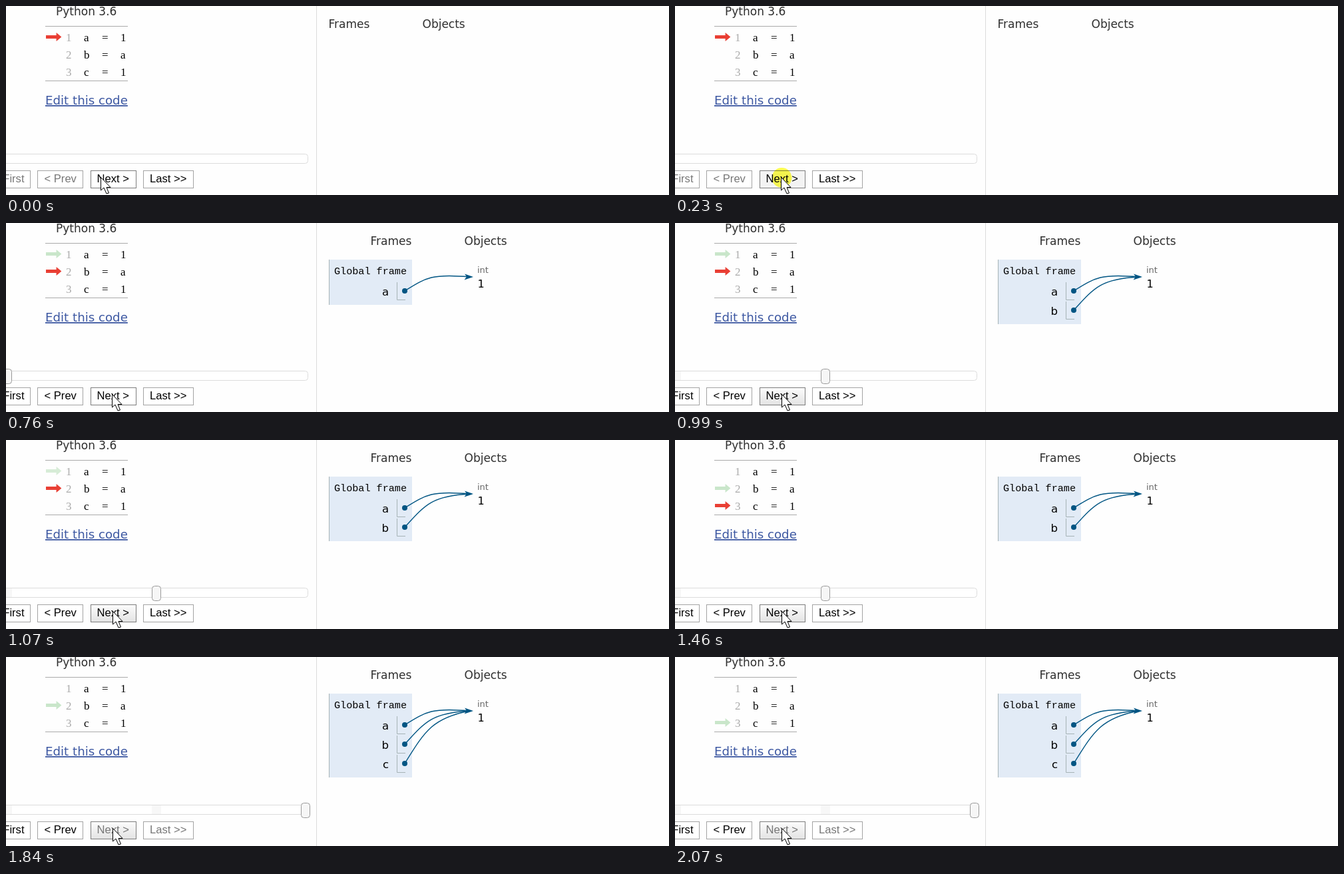
Write an HTML page that moves like this. It is 996 px wide and 284 px high and loops after 2.47 s.

```html
<!DOCTYPE html>
<html lang="en">
<head>
<meta charset="utf-8">
<title>Code stepper</title>
<style>
  html, body { margin: 0; width: 100%; height: 100%; overflow: hidden; background: #fefefe; }
  svg { display: block; width: 996px; height: 284px; }
  text { white-space: pre; }
  .ui { font: 17px "DejaVu Sans", Verdana, sans-serif; fill: #303030; }
  .code { font: 17px "Liberation Serif", "Times New Roman", serif; }
  .mono { font: 15.15px "Liberation Mono", "Courier New", monospace; }
  .num { fill: #aaa; }
  .btn rect { fill: #fff; stroke: #a3a3a3; }
  .btn text { font: 16.6px "Liberation Sans", Arial, sans-serif; }
  .btn.off text { fill: #777; }
  #next rect { stroke: #7d7d7d; }
  .wire { fill: none; stroke: #005583; stroke-width: 1.4; }
  .slot { fill: none; stroke: #a6b3b6; }
  .rule { stroke: #aaa; }
</style>
</head>
<body>
<svg viewBox="0 0 996 284">
  <defs>
    <path id="arrow" transform="scale(1.3)" d="M0 3H12V0L18 5 12 10V7H0Z"/>
    <linearGradient id="hover" x2="0" y2="1">
      <stop stop-color="#fcfcfc"/><stop offset="1" stop-color="#e3e3e3"/>
    </linearGradient>
  </defs>

  <path d="M466.5 0V284" stroke="#dcdcdc"/>
  <text class="ui" x="75" y="14">Python 3.6</text>
  <path class="rule" d="M59 30.5H183M59 112.5H183"/>
  <g id="lines"></g>
  <use id="prevArrow" href="#arrow"/>
  <use id="curArrow" href="#arrow" fill="#e93f34"/>
  <text class="ui" x="59" y="148" style="font-size:18.2px;fill:#3d58a2;text-decoration:underline">Edit this code</text>

  <rect x="-20.5" y="222.5" width="474" height="14" rx="4" fill="#fff" stroke="#dcdcdc"/>
  <rect id="trail1" x="-5" y="223" width="14" height="13" fill="#f7f7f7"/>
  <rect id="trail2" x="219" y="223" width="14" height="13" fill="#f7f7f7"/>
  <rect id="handle" y="219.5" width="13" height="22" rx="4" fill="#f6f6f6" stroke="#999"/>

  <g id="first" class="btn"><rect x="-40.5" y="247.5" width="77" height="26"/><text x="27.5" y="265" text-anchor="end">&lt;&lt; First</text></g>
  <g id="prev" class="btn"><rect x="47.5" y="247.5" width="68" height="26"/><text x="57.5" y="265">&lt; Prev</text></g>
  <g id="next" class="btn"><rect x="127.5" y="247.5" width="68" height="26"/><text x="136.5" y="265">Next &gt;</text></g>
  <g id="last" class="btn"><rect x="206.5" y="247.5" width="75" height="26"/><text x="216" y="265">Last &gt;&gt;</text></g>

  <g id="heads">
    <text class="ui" x="484.5" y="33">Frames</text>
    <text class="ui" x="625.5" y="33">Objects</text>
  </g>
  <g id="heap">
    <rect id="frame" x="485" y="55" width="125" fill="#e2ebf6"/>
    <rect id="edge" x="485" y="55" width="1" fill="#a6b3b6"/>
    <text class="mono" x="493" y="77">Global frame</text>
    <text class="ui" x="708" y="75" style="font-size:13px;fill:#666">int</text>
    <text class="ui" x="708.5" y="97" style="font-size:16px;fill:#000">1</text>
    <g id="vars"></g>
    <path d="M702 81L689 76.5 692 80.8 688.5 85.5Z" fill="#005583"/>
  </g>

  <circle id="click" cx="160.5" cy="258" r="15" fill="#ff0" opacity=".68" style="mix-blend-mode:multiply"/>
  <path id="cursor" d="M.5 .5V20L5 16 9 25 12.5 24 9 15.5H15Z" fill="#fff" stroke="#000"/>
</svg>
<script>
const LOOP = 2470;
const TICKS = [0, 70, 150, 220, 300, 530, 610, 690, 760, 840, 990, 1070, 1150,
  1220, 1300, 1380, 1460, 1760, 1840, 1920, 1990, 2070];
const STEPS = [300, 990, 1840];   // when each step takes effect
const FADE = 200, SLIDE = 250;
const LIGHT = [201, 230, 202];

const $ = id => document.getElementById(id);
const show = (id, on) => $(id).style.display = on ? '' : 'none';
const move = (id, x, y) => $(id).setAttribute('transform', `translate(${x} ${y})`);
const clamp = x => Math.max(0, Math.min(1, x));
const ease = x => x < .5 ? 4 * x ** 3 : 1 - 4 * (1 - x) ** 3;
const lineY = i => 40 + 26 * i;

$('lines').innerHTML = [['a', '1'], ['b', 'a'], ['c', '1']].map(([left, right], i) => {
  const y = 53 + 26 * i;
  return `<g class="code"><text class="num" x="90" y="${y}">${i + 1}</text>
    <text x="117" y="${y}">${left}</text><text x="144" y="${y}">=</text>
    <text x="172" y="${y}">${right}</text></g>`;
}).join('');

$('vars').innerHTML = ['a', 'b', 'c'].map((name, i) => {
  const y = 102 + 29 * i;
  return `<g id="var${i}">
    <text class="ui" x="575" y="${y + 7}" text-anchor="end" style="font-size:16.5px;fill:#000">${name}</text>
    <path class="slot" d="M587.5 ${y - 13}V${y + 13.5}H600"/>
    <circle cx="599" cy="${y}" r="4" fill="#005583"/>
    <path class="wire" d="M599 ${y}C${631 - i} ${82 + 15 * i} 640 ${76 + 8 * i} 696 81"/></g>`;
}).join('');

function draw(t) {
  const step = STEPS.filter(s => t >= s).length;
  const since = step ? t - STEPS[step - 1] : 0;
  const faded = since >= FADE;

  // The pale arrow fades out, then reappears on the line just run.
  const prevLine = faded ? step - 1 : step - 2;
  const fade = step && !faded ? ease(clamp(since / FADE)) : 0;
  show('prevArrow', prevLine >= 0);
  move('prevArrow', 60, lineY(prevLine));
  $('prevArrow').setAttribute('fill', `rgb(${LIGHT.map(c => c + (254 - c) * fade)})`);

  const slide = ease(clamp((since - FADE) / SLIDE));
  show('curArrow', step < 3);
  move('curArrow', 60, lineY(step ? step - 1 + slide : 0));

  show('heap', step > 0);
  move('heads', step ? 63 : 0, 0);
  for (let i = 0; i < 3; i++) show('var' + i, step > i);
  for (const id of ['frame', 'edge']) $(id).setAttribute('height', 39 + 29 * step);

  $('handle').setAttribute('x', [-230, -4.5, 219.5, 443.5][step]);
  show('trail1', step > 1);
  show('trail2', step > 2);
  for (const id of ['first', 'prev']) $(id).classList.toggle('off', step === 0);
  for (const id of ['next', 'last']) $(id).classList.toggle('off', step === 3);

  const pressed = t >= 150 && t < 300 || t >= 840 && t < 990 || t >= 1760 && t < 1840;
  show('click', pressed);
  $('next').firstChild.style.fill = pressed ? '#f3f3f3' : step > 1 ? 'url(#hover)' : '#fff';
  move('cursor', t < 70 ? 142 : t < 150 ? 151 : t < 840 ? 159 : 160, 257);
}

const start = performance.now();
function tick() {
  const t = (performance.now() - start) % LOOP;
  draw(TICKS.findLast(k => k <= t));
  requestAnimationFrame(tick);
}
tick();
</script>
</body>
</html>
```
